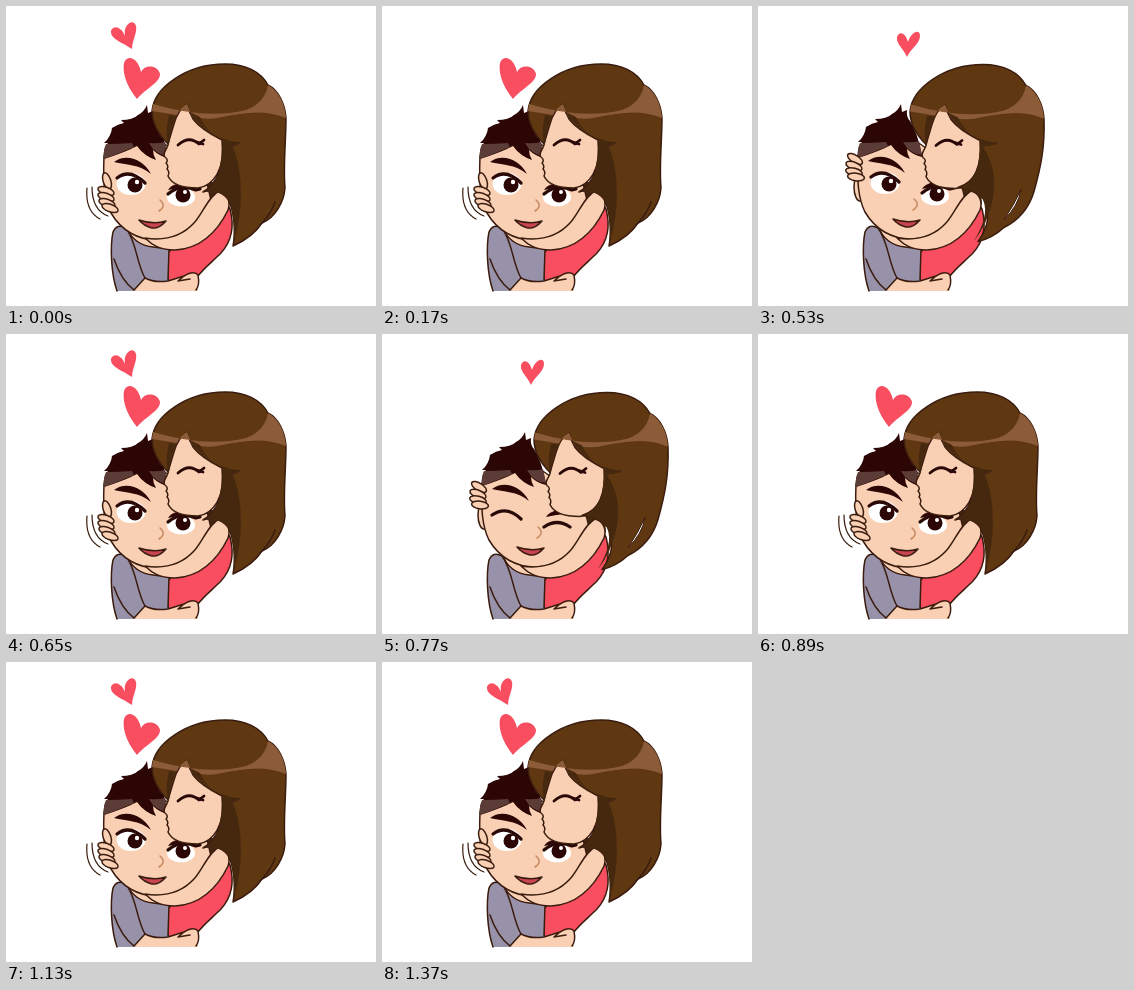
Write an HTML page that moves like this. It is 370 px wide and 300 px high and loops after 1.44 s.

```html
<!DOCTYPE html>
<html lang="en">
<head>
<meta charset="utf-8">
<title>Hug</title>
<style>
  html, body { margin: 0; width: 100%; height: 100%; overflow: hidden; background: #fff; }
  svg { display: block; width: 370px; height: 300px; }
  .ln { fill: none; }
  .ln, .o { stroke: #3a1c0e; stroke-width: 1.5; stroke-linecap: round; stroke-linejoin: round; }
  .skin { fill: #f9d0b3; }
  .hair { fill: #5f3812; }
  .shade { fill: #46280f; }
  .shine { fill: #8c5c38; }
  .dark { fill: #2c0505; }
  .gloss { fill: #5b3c37; }
  .shirt { fill: #9791aa; }
  .red { fill: #f94d60; }
  .thick { stroke: #2a0a08; stroke-width: 3.2; }

  /* Twelve beats of 120 ms; the loop starts 70 ms into a beat. */
  .near, .far, .rise, .open, .shut { animation: near 240ms step-end -70ms infinite; }
  .far { animation-name: far; }
  .rise { animation-name: rise; animation-duration: 720ms; }
  .open { animation-name: open; animation-duration: 1440ms; }
  .shut { animation-name: shut; animation-duration: 1440ms; }
  @keyframes near { 0% { opacity: 1 } 50%, 100% { opacity: 0 } }
  @keyframes far { 0% { opacity: 0 } 50%, 100% { opacity: 1 } }
  @keyframes rise { 0% { opacity: 1 } 33.333% { opacity: 0 } 50%, 100% { opacity: 1 } }
  @keyframes open { 0% { opacity: 1 } 58.333% { opacity: 0 } 66.667%, 100% { opacity: 1 } }
  @keyframes shut { 0% { opacity: 0 } 58.333% { opacity: 1 } 66.667%, 100% { opacity: 0 } }
</style>
</head>
<body>
<svg viewBox="0 0 370 300">
  <defs>
    <g id="body">
      <path class="shade" d="M188 176 L222 176 L224 198 L190 216Z"/>
      <path class="o red" d="M162 240 C182 244 200 220 218 194 L224 203 C229 222 225 236 215 247 C206 256 198 262 192 270 L162 277Z"/>
      <path class="o skin" d="M119 218 L128 236 Q143 247 164 245 L165 228Z"/>
      <path class="shirt" d="M111 285 C105 268 104 240 107 226 Q111 217 120 222 Q130 240 147 241 L163 243 L162 277 L140 285Z"/>
      <path class="ln" d="M111 285 C105 268 104 240 107 226 Q111 217 120 222 Q130 240 147 241 L163 243 L162 274 M120 222 C131 237 130 256 139 272 M108 253 Q115 274 128 284"/>
      <path class="skin" d="M128 285 L139 272 Q148 277 162 275 L178 270 Q188 264 192 269 L192 285Z"/>
      <path class="ln" d="M128 284 L139 272 Q148 277 162 275 L178 270 Q188 264 192 269 Q194 279 190 284 M178 270 L172 275 L184 273"/>
    </g>

    <path id="arm" class="o skin" d="M213 185 C221 187 225 195 222 204 C211 227 193 243 169 244 C154 244 146 239 139 232 C159 235 176 230 188 217 C197 207 202 191 213 185Z"/>

    <g id="face">
      <path class="o skin" d="M98 150 C97 176 98 193 105 207 C115 224 132 235 154 234 C178 232 193 216 205 194 L198 165 L150 132Z"/>
      <path class="dark" d="M98 153 C97 145 99 140 102 137 L98 137 Q105 131 106 122 Q112 118 118 117 L115 114 Q127 114 132 109 Q138 106 141 99 L142 107 L147 105 Q146 112 150 116 Q158 128 162 152 Q153 150 147 144 Q147 149 150 154 Q138 150 131 140 Q120 146 98 153Z"/>
      <path class="gloss" d="M100 138 Q112 138 126 137 L128 141 Q114 147 98 153Q97 144 100 138Z M143 137 Q152 138 159 136 L162 150 Q153 149 147 143Z"/>
      <path class="dark" d="M108 156 C118 148 136 151 145 168 C133 158 120 159 108 156Z"/>
      <path class="dark" d="M162 184 C166 177 180 174 198 180 Q180 180 162 184Z"/>
      <path class="ln" style="stroke:#c98c65" d="M154 194 Q161 200 153 205"/>
      <path class="o" fill="#c94451" d="M133 214 Q148 219 160 215 Q153 223 146 222 Q138 220 133 214Z"/>
    </g>

    <g id="eyes">
      <ellipse fill="#fff" cx="125" cy="178" rx="14.5" ry="11"/>
      <circle class="dark" cx="129" cy="179" r="7.5"/>
      <circle fill="#fff" cx="131" cy="176" r="2.2"/>
      <path class="ln thick" d="M111 172 Q124 162 139 177"/>
      <ellipse fill="#fff" cx="175" cy="191" rx="14" ry="9.5"/>
      <circle class="dark" cx="177" cy="189" r="7.5"/>
      <circle fill="#fff" cx="179" cy="186" r="2"/>
      <path class="ln thick" d="M162 188 Q175 177 190 184 L194 183"/>
    </g>

    <path id="lids" class="ln thick" d="M108 182 Q123 172 137 186 M160 194 Q173 185 186 194"/>

    <path id="cheek" class="o skin" d="M178 92 C167 110 164 128 162 139 C160 145 156 148 159 151 Q163 154 160 157 Q163 160 161 163 Q164 166 162 170 C166 179 178 182 192 182 C208 180 218 163 218 136 L200 98Z"/>

    <g id="top">
      <path class="shine" d="M147 98 Q200 114 240 104 Q259 97 262 79 C272 84 279 97 280 112 C258 103 238 107 216 111 Q202 115 186 110 L181 98 Q174 102 171 109 L146 105Z"/>
      <path class="shade" d="M216 132 Q224 136 235 136 Q230 140 227 141 C237 165 238 205 227 239 C229 222 228 205 222 193 Q214 184 199 186 C212 178 218 160 216 132Z"/>
      <path class="shade" d="M184 106 Q189 116 205 126 Q197 119 194 111Z M170 110 Q163 126 162 138 Q159 125 163 109Z"/>
      <path class="ln" style="stroke:#2a0a08;stroke-width:2.8" d="M172 139 Q183 129 193 138 L198 134 M191 136 L197 138"/>
    </g>

    <ellipse id="tip" class="o skin" rx="8.5" ry="3.8"/>
  </defs>

  <rect width="370" height="300" fill="#fff"/>

  <g class="near">
    <use href="#body"/>
    <use href="#face"/>
    <use href="#eyes"/>
    <use href="#arm"/>
    <use href="#cheek"/>
    <path class="o hair" d="M162 138 C151 127 146 116 146 105 C148 82 180 58 219 58 C240 58 255 66 262 79 C272 84 279 97 280 112 C280 135 277 160 279 182 C278 196 269 212 256 217 Q247 231 227 240 C230 225 228 205 222 193 C214 184 206 183 197 186 C211 178 218 160 216 134 C204 128 193 121 187 113 Q183 106 181 98 Q172 104 168 118Z"/>
    <use href="#top"/>
    <path class="ln" d="M256 217 Q266 206 269 196"/>
    <use href="#tip" transform="translate(101 175) rotate(72)"/>
    <use href="#tip" transform="translate(100 185) rotate(20)"/>
    <use href="#tip" transform="translate(100 191) rotate(20)"/>
    <use href="#tip" transform="translate(101 197) rotate(20)"/>
    <use href="#tip" transform="translate(104 202) rotate(20)"/>
    <path class="ln" style="stroke-width:1.2" d="M81 182 Q79 205 94 213 M86 181 Q86 204 102 210"/>
    <path class="red" d="M131 93 C121 81 116 67 118 57 C121 48 132 51 135 66 C139 58 152 59 154 68 C154 77 140 82 131 93Z"/>
    <path class="red rise" d="M126 43 C116 36 104 33 105 25 C107 19 115 20 119 30 C117 19 126 13 129 18 C133 24 126 34 126 43Z"/>
  </g>

  <g class="far">
    <use href="#body"/>
    <ellipse class="o skin" cx="102" cy="181" rx="6" ry="14"/>
    <g transform="translate(2 -1)">
      <use href="#face"/>
      <use class="open" href="#eyes"/>
      <use class="shut" href="#lids"/>
    </g>
    <use href="#arm"/>
    <g transform="translate(6 .5)">
      <use href="#cheek"/>
      <path class="o hair" d="M162 138 C151 127 146 116 146 105 C148 82 180 58 219 58 C240 58 255 66 262 79 C272 84 279 97 280 112 C281 140 277 160 270 185 C264 205 250 216 240 221 Q228 232 214 235 C225 220 226 205 220 193 C213 184 204 182 194 181 C211 176 218 160 216 134 C204 128 193 121 187 113 Q183 106 181 98 Q172 104 168 118Z"/>
      <g transform="translate(216 0) skewX(-3) translate(-209 0)">
        <path class="shade" d="M216 136 Q236 160 232 192 Q228 218 215 235 C224 218 228 205 222 193 Q214 184 199 182 C212 178 218 160 216 136Z"/>
      </g>
      <path class="shine" d="M147 98 Q200 114 240 104 Q259 97 262 79 C272 84 279 97 280 112 C258 103 238 107 216 111 Q202 115 186 110 L181 98 Q174 102 171 109 L146 105Z"/>
      <path class="shade" d="M216 132 Q224 136 235 136 Q230 140 218 140Z M184 106 Q189 116 205 126 Q197 119 194 111Z M170 110 Q163 126 162 138 Q159 125 163 109Z"/>
      <path class="ln" style="stroke:#2a0a08;stroke-width:2.8" d="M172 139 Q183 129 193 138 L198 134 M191 136 L197 138"/>
      <path class="o" fill="#fff" style="stroke-width:1" d="M257 183 Q254 200 240 213 Q250 199 257 183Z"/>
    </g>
    <use href="#tip" transform="translate(97 153) rotate(32)"/>
    <use href="#tip" transform="translate(96 160) rotate(22)"/>
    <use href="#tip" transform="translate(96 166) rotate(14)"/>
    <use href="#tip" transform="translate(98 171) rotate(8)"/>
    <path class="red" d="M149 51 C145 42 138 38 139 31 C141 24 148 27 150 36 C153 26 162 22 162 30 C162 38 152 43 149 51Z"/>
  </g>
</svg>
</body>
</html>
```
